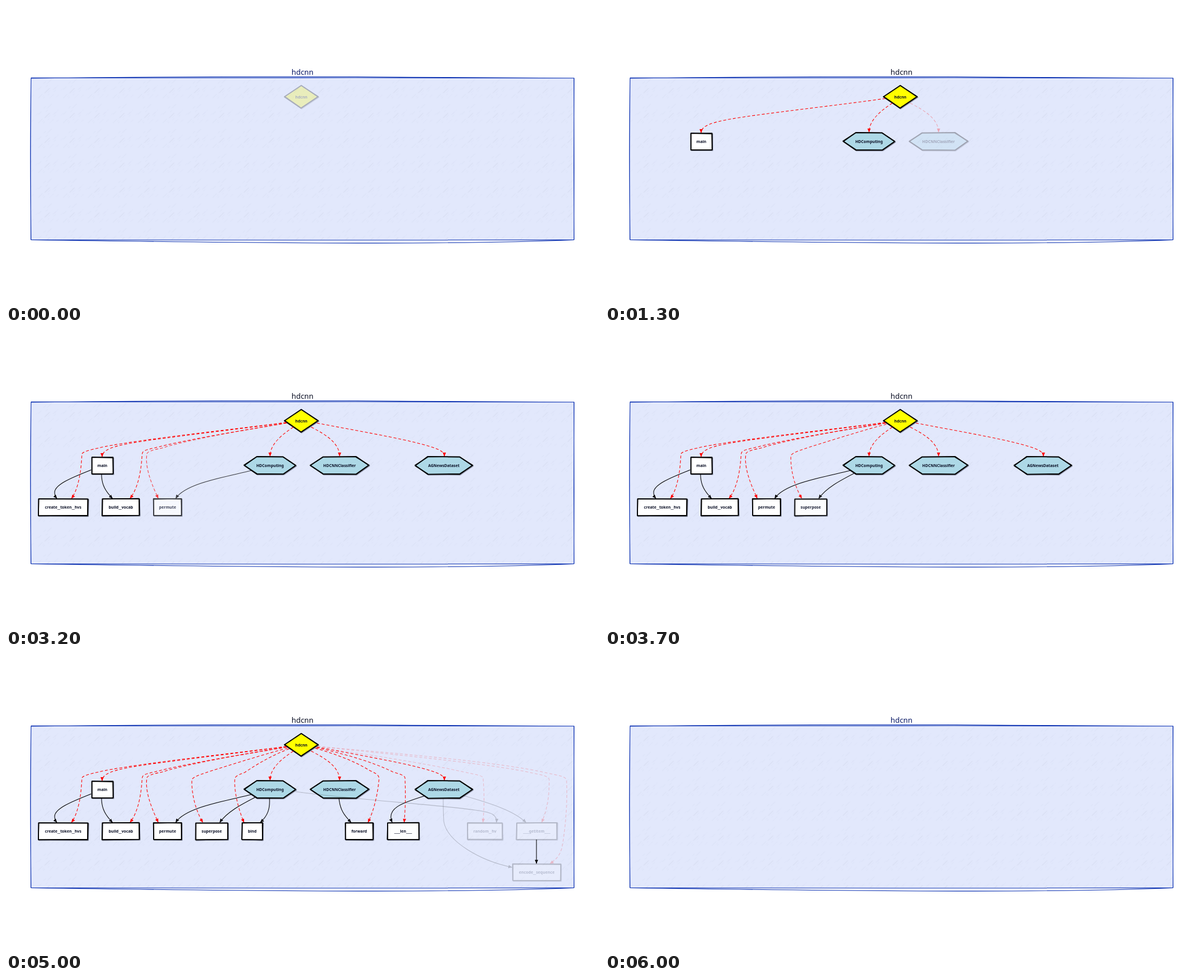
Recreate the animation shown at these times as an HTML page. Size 1024 px wide and 512 px high, loop 7200 ms.

```html
<!DOCTYPE html>
<html lang="en">
<head>
<meta charset="utf-8">
<title>hdcnn call graph</title>
<style>
  html, body { margin: 0; width: 100%; height: 100%; overflow: hidden; background: #fff; }
  svg { display: block; width: 1024px; height: 512px; }
  text { font-family: "Noto Sans", "Open Sans", sans-serif; text-anchor: middle; fill: #0a0f25; }
  .label { font-size: 6.75px; font-weight: 700; }
  .wide { font: 9px "Liberation Sans", Arial, sans-serif; }
  .title { font-size: 12.9px; }
  .title.tint { fill: #0a1a66; }
  .frame { fill: none; stroke: #0d32b2; stroke-width: 1.1; }
  .streak { stroke: #0a0f25; stroke-width: .7; stroke-linecap: round; }
  .node { filter: drop-shadow(1.4px 1.9px .7px rgba(30, 35, 60, .42)); }
  .outline { fill: none; stroke: #000; stroke-width: 1.65; stroke-linejoin: round; }
  .edge { fill: none; stroke: #000; stroke-width: 1.05; marker-end: url(#tip); }
  .dashed { stroke: #f00; stroke-dasharray: 5 3.4; marker-end: url(#redTip); }
</style>
</head>
<body>
<svg viewBox="0 0 1024 512">
  <defs>
    <marker id="tip" viewBox="0 0 7 6" refX="6.6" refY="3" markerWidth="7" markerHeight="6" markerUnits="userSpaceOnUse" orient="auto">
      <path d="M0 .2L7 3L0 5.8Z"/>
    </marker>
    <marker id="redTip" viewBox="0 0 7 6" refX="6.6" refY="3" markerWidth="7" markerHeight="6" markerUnits="userSpaceOnUse" orient="auto">
      <path d="M0 .2L7 3L0 5.8Z" fill="#f00"/>
    </marker>
    <pattern id="streaks" x="49.5" y="124.5" width="43" height="43" patternUnits="userSpaceOnUse"></pattern>
  </defs>
  <path d="M43 124.5H981V404.5H43Z" fill="#e2e8fc"/>
  <path d="M43 124.5H981V404.5H43Z" fill="url(#streaks)"/>
  <g class="frame">
    <path d="M43 125C280 122 520 121.8 700 123.2S900 124.6 981 124.8M43 124.4C300 124 680 123.6 981 124.8"/>
    <path d="M981 124.5C980.4 220 980.4 310 981 404.5M980.7 124.5C981 220 981 310 980.8 404.5"/>
    <path d="M981 404.5C700 405.2 320 405 43 404.5M981 404.5C800 412 560 412 43 404.5"/>
    <path d="M43.3 404.5C42 310 41.8 220 43.3 124.5M43 404.5C42.4 310 42 220 43.3 124.5"/>
  </g>
  <text class="title" x="512" y="119">hdcnn</text>
  <g id="graph"></g>
</svg>
<script>
const LOOP = 7200, TICK = 100, FADE = 400, OUT = 5600;
const STEP = 6000 / 14, TAIL = 4920;
const graph = document.getElementById('graph');
const title = document.querySelector('.title');
const parts = [];

let seed = 11;
function rand() {
  seed = (seed * 16807) % 2147483647;
  return seed / 2147483647;
}

function add(parent, tag, attrs, content = '') {
  const el = document.createElementNS('http://www.w3.org/2000/svg', tag);
  for (const key in attrs) el.setAttribute(key, attrs[key]);
  el.innerHTML = content;
  return parent.appendChild(el);
}

const polygon = (points, wobble = 0) => 'M' + points.map(
  p => p.map(v => (v + (rand() - .5) * wobble).toFixed(2)).join(' ')
).join('L') + 'Z';

const rect = (x1, x2, y = 220.3) => [[x1, y], [x2, y], [x2, y + 28.8], [x1, y + 28.8]];
const hex = (x1, x2) => [[x1, 234.3], [x1 + 22, 219.2], [x2 - 22, 219.2], [x2, 234.3], [x2 - 22, 249.3], [x1 + 22, 249.3]];

function part(start, fade = FADE) {
  const group = add(graph, 'g', { opacity: 0 });
  parts.push({ group, start, fade });
  return group;
}

function node(start, name, points, fill, red, ...black) {
  const group = part(start);
  black.forEach(d => add(group, 'path', { class: 'edge', d }));
  if (red) add(group, 'path', { class: 'edge dashed', d: red });
  const shape = add(group, 'g', { class: 'node' });
  add(shape, 'path', { d: polygon(points), fill });
  for (let i = 0; i < 2; i++) add(shape, 'path', { class: 'outline', d: polygon(points, 1.1) });
  const xs = points.map(p => p[0]), ys = points.map(p => p[1]);
  const mid = v => (Math.min(...v) + Math.max(...v)) / 2;
  add(group, 'text', { class: 'label', x: mid(xs), y: mid(ys) + 2.4 },
    name.replace(/_+/g, '<tspan class="wide">$&</tspan>'));
}

const streaks = document.getElementById('streaks');
const streak = (x, y, r, a) => add(streaks, 'path', {
  class: 'streak', 'stroke-opacity': a, d: `M${x - r} ${y + r}L${x + r} ${y - r}`
});
streak(21.5, 22, 4, .13);
for (let i = 0; i < 15; i++) streak(4 + rand() * 35, 5 + rand() * 33, 1 + rand() * 2.5, .025 + rand() * .05);

const white = '#fff', blue = '#add8e6';
const nodes = [
  ['hdcnn', [[510, 137.3], [539, 157], [510, 177], [481, 157]], '#ff0', ''],
  ['main', rect(148, 184.8), white,
    'M484 160C400 172 280 185 220 195C185 201 166 207 166 219.5'],
  ['HDComputing', hex(411.5, 500.5), blue,
    'M496 168C475 182 456 198 456 218.5'],
  ['HDCNNClassifier', hex(525.5, 626.5), blue,
    'M527 168C555 182 576 197 576 218.5'],
  ['AGNewsDataset', hex(706.5, 805.5), blue,
    'M537 161C600 173 680 187 720 198C745 205 757 209 757 218.5'],
  ['create_token_hvs', rect(56, 141.3, 292.2), white,
    'M484 160C380 173 210 192 160 204C134 210 131 212 131 216C130 240 126 274 113 291.5',
    'M147 242C120 253 84 266 84 281C84 285 85 288 88 291.5'],
  ['build_vocab', rect(166.3, 230.2, 292.2), white,
    'M484 161C400 175 310 190 256 204C238 208 235 210 235 216C234 235 230 272 214 291.5',
    'M165 249.5C165 268 172 279 184 291.5'],
  ['permute', rect(255, 303, 292.2), white,
    'M485 161C420 172 320 188 270 204C247 209 243 211 243 216C240 240 253 270 263 291.5',
    'M424 243C380 254 310 265 293 291.5'],
  ['superpose', rect(327.7, 382.8, 292.2), white,
    'M486 163C450 172 400 188 352 203C325 212 322 214 321 218C320 242 328 272 340 291.5',
    'M430 248C405 261 382 273 369 291.5'],
  ['bind', rect(407.5, 443, 292.2), white,
    'M489 164C465 173 440 186 412 205C397 210 395 213 395 218C394 240 402 270 411 291.5',
    'M455 250C456 268 452 280 439 291.5'],
  ['forward', rect(586, 633.8, 292.2), white,
    'M534 163C565 172 600 184 627 201C642 208 645 210 644 218C642 240 636 270 625 291.5',
    'M575 250C577 270 584 279 596 291.5'],
  ['__len__', rect(658.8, 712.8, 292.2), white,
    'M536 162C580 172 630 185 668 204C685 209 690 211 689 216C690 240 690 265 687.5 291.5',
    'M724 245C690 256 655 265 667 291.5'],
  ['random_hv', rect(797, 857, 292.2), white,
    'M537 161C610 172 720 188 790 204C820 210 825 211 824 217C826 240 826 268 823.5 291.5',
    'M500 238C600 252 740 260 810 270C840 274 848 278 847 291.5'],
  ['__getitem__', rect(881.7, 951.3, 292.2), white,
    'M538 160C660 173 840 190 910 206C935 211 939 213 938 220C938 245 935 268 925 291.5',
    'M790 245C840 259 878 272 898 291.5'],
  ['encode_sequence', rect(875, 958, 363.4), white,
    'M538 160C680 172 860 188 935 206C965 212 967 213 968 220C970 260 965 310 960 335C956 350 948 357 939 363',
    'M755 250C755 262 755 275 756 290C762 325 820 358 874 369']
];
nodes.forEach((n, i) => node(i < 12 ? i * STEP - 100 : TAIL, ...n));
add(part(4800, 100), 'path', { class: 'edge', d: 'M916 321V362.5' });

const clamp = v => Math.max(0, Math.min(1, v));

function draw(now) {
  const t = Math.floor((now % LOOP) / TICK) * TICK;
  const out = clamp((6000 - t) / (6000 - OUT));
  for (const p of parts) p.group.setAttribute('opacity', clamp((t - p.start) / p.fade) * out);
  title.classList.toggle('tint', t === 0 || t >= 6000);
  requestAnimationFrame(draw);
}
draw(performance.now());
</script>
</body>
</html>
```
